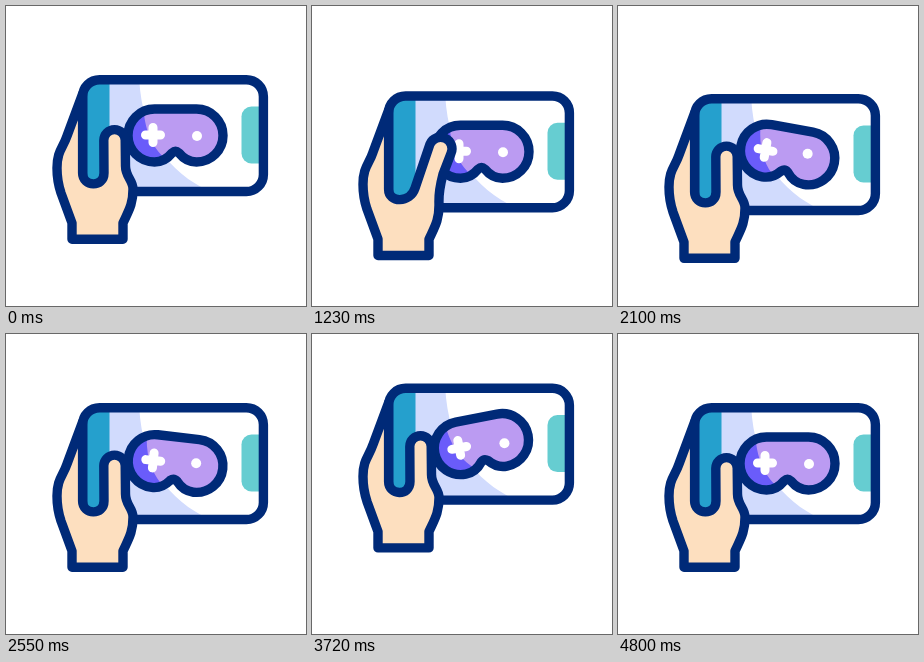
Recreate the animation shown at these times as an HTML page. Size 300 px wide and 300 px high, loop 5430 ms.

```html
<!DOCTYPE html>
<html lang="en">
<head>
<meta charset="utf-8">
<title>Mobile gaming</title>
<style>
  html, body { margin: 0; width: 100%; height: 100%; overflow: hidden; background: #fff; }
  svg { display: block; width: 100%; height: 100%; }
  .line { stroke: #002a78; stroke-width: 9.4; stroke-linejoin: round; stroke-linecap: round; }
</style>
</head>
<body>
<svg viewBox="0 0 300 300">
  <defs>
    <rect id="phone" x="76.6" y="73.7" width="180.800" height="111.800" rx="17"/>
    <clipPath id="screen"><use href="#phone"/></clipPath>
    <path id="pad" d="M148.5 103H190.5A26.5 26.5 0 0 1 190.5 156C182 156 177 152 173 147Q169.5 144 166 147C162 152 157 156 148.5 156A26.5 26.5 0 0 1 148.5 103Z"/>
    <clipPath id="padClip"><use href="#pad"/></clipPath>
  </defs>
  <g id="scene">
    <g clip-path="url(#screen)">
      <use href="#phone" fill="#fff"/>
      <path d="M75 70H133C136 130 160 165 205 186H75Z" fill="#d1dbfd"/>
      <rect x="75" y="70" width="28.500" height="120" fill="#25a0cd"/>
      <rect x="235.500" y="100.500" width="40" height="57" rx="10" fill="#66cdd1"/>
    </g>
    <use href="#phone" class="line" fill="none"/>
    <g id="controller">
      <g clip-path="url(#padClip)">
        <rect x="115" y="95" width="110" height="70" fill="#bb9bf2"/>
        <path d="M110 95H137C138 125 146 142 162 155V165H110Z" fill="#6a5cfa"/>
      </g>
      <use href="#pad" class="line" fill="none"/>
      <path d="M139.500 129H154.500M147 121.500V136.500" stroke="#fff" stroke-width="9" stroke-linecap="round"/>
    </g>
    <circle id="button" r="5" fill="#fff"/>
    <path id="hand" class="line"/>
  </g>
</svg>
<script>
const LOOP = 5430, STEP = 30, BOB = 24, TILT = 11, LEAN = 0.42;
const [scene, controller, button, hand] =
  ["scene", "controller", "button", "hand"].map(id => document.getElementById(id));

const mix = (a, b, k) => a + (b - a) * k;

// Smooth step from 0 to 1 between two times.
function ease(time, start, end) {
  const k = Math.min(1, Math.max(0, (time - start) / (end - start)));
  return k * k * (3 - 2 * k);
}

// The thumb tip is a round cap that leans over and travels as it presses.
function handPath(press, raise) {
  const radius = mix(10.7, 11.5, press);
  const dx = radius * Math.cos(LEAN * press), dy = radius * Math.sin(LEAN * press);
  const tipX = mix(108.5, 128.5, press);
  const tipY = mix(134.3, 126.5, press) - 2.5 * raise;
  const gapX = mix(98, 103, press), gapY = 167 - press;
  const sideX = mix(119.5, 131, press), sideY = mix(160, 152, press);
  const gap = `M76.6 88V167C76.6 181 ${gapX - 5 * press} ${gapY + 15} ${gapX} ${gapY}`;
  const tip = `L${tipX - dx} ${tipY - dy}A${radius} ${radius} 0 0 1 ${tipX + dx} ${tipY + dy}`;
  const palm = `L${sideX} ${sideY}C${mix(sideX, 126, press)} 171 127 174 127 183`;
  const wrist = "C127 198 123 204 117 217V233.3H66V217";
  const back = "L55 187C52 178 51 170 51 162C51 145 57 142 61 130Z";
  return gap + tip + palm + wrist + back;
}

function draw(time) {
  const ramp = (start, end) => ease(time, start, end);
  const bob = BOB * (ramp(300, 1800) - 2 * ramp(1800, 3300) + ramp(3300, 4800));
  const tilt = TILT * (ramp(1500, 2200) - ramp(2200, 3000) - ramp(3000, 3750) + ramp(3750, 4500));
  const press = ramp(300, 780) - ramp(1350, 1700);
  const raise = ramp(1350, 1700) - ramp(4200, 4700);
  const shade = ramp(450, 690) - ramp(690, 930);

  scene.setAttribute("transform", `translate(0 ${bob})`);
  controller.setAttribute("transform", `rotate(${tilt} 169.5 130)`);
  button.setAttribute("cx", 191 - 0.13 * tilt);
  button.setAttribute("cy", 130 - 0.12 * Math.abs(tilt));
  hand.setAttribute("d", handPath(press, raise));
  hand.setAttribute("fill", `rgb(${mix(253, 235, shade)} ${mix(223, 210, shade)} ${mix(191, 184, shade)})`);
}

const began = performance.now();
function tick() {
  const time = (performance.now() - began) % LOOP;
  draw(Math.floor(time / STEP) * STEP);
  requestAnimationFrame(tick);
}
tick();
</script>
</body>
</html>
```
